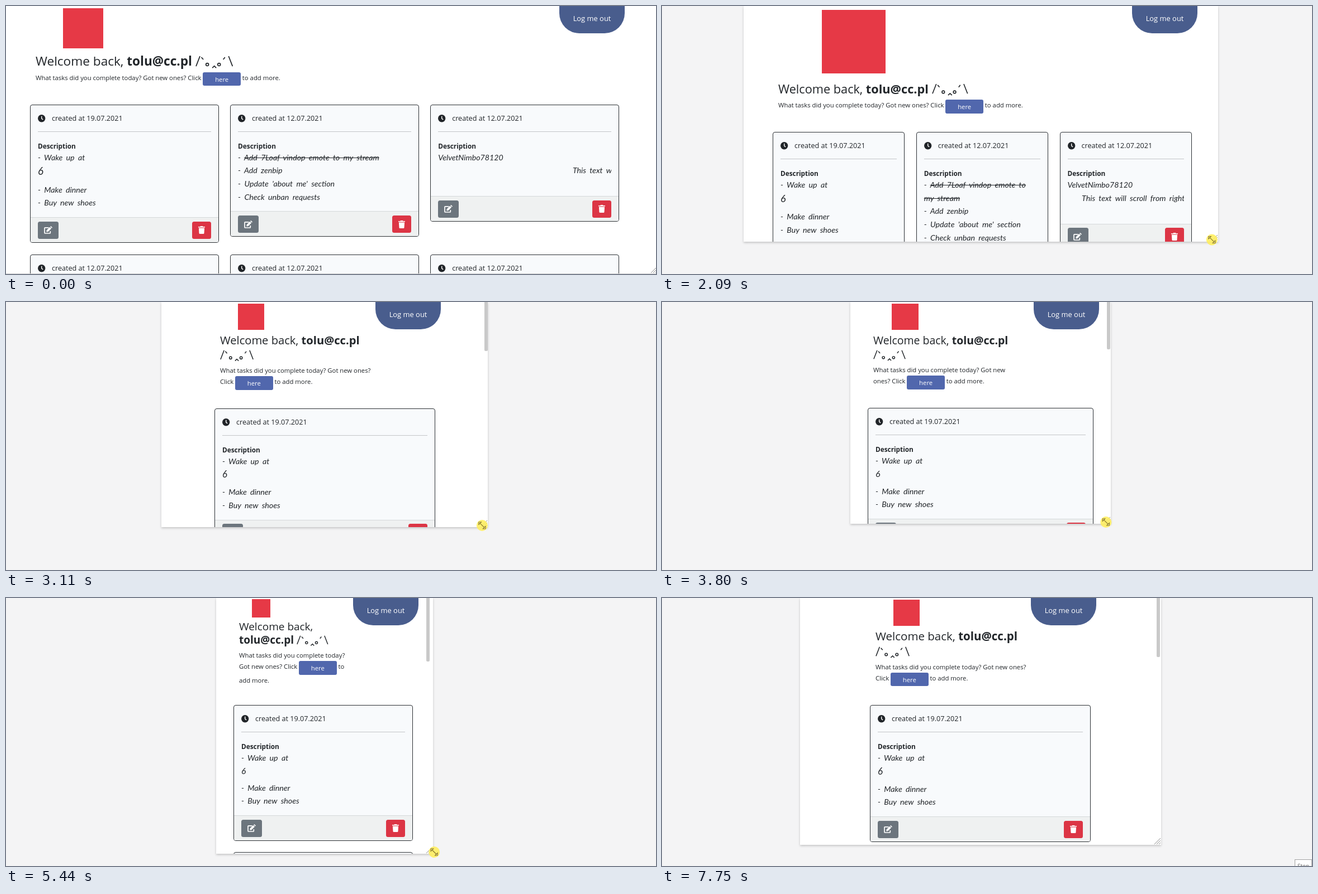
An HTML page for the animation above (7.82 s loop, 1163 px wide and 481 px high).

```html
<!DOCTYPE html>
<html lang="en">
<head>
<meta charset="utf-8">
<title>Responsive task board</title>
<style>
html, body { margin: 0; width: 100%; height: 100%; overflow: hidden; background: #f4f4f5; }
body { position: relative; color: #212529; font-family: "Open Sans", "Noto Sans", sans-serif; }
svg { display: block; overflow: visible; }
#page { position: absolute; top: 0; background: #fff; overflow: hidden; }
#shade { position: absolute; top: 0; box-shadow: 0 2px 4px rgba(0,0,0,.2); }
#main { position: absolute; top: 0; }
#logout { position: absolute; top: 0; right: -10px; width: 117px; height: 48.5px; border-radius: 0 0 36px 36px;
  background: #495d8d; color: #fff; font-size: 12.9px; line-height: 45px; text-align: center; }
#top { margin-left: 10px; }
#logo { position: relative; }
#logo i { position: absolute; left: 28.5%; top: 5%; height: 85%; aspect-ratio: 1; background: #e63946; }
#top h3 { margin: 0; font-weight: 400; font-size: calc(22.6px * var(--k)); line-height: calc(29.5px * var(--k)); }
#face { display: inline-block; width: 2.98em; height: 1.067em; vertical-align: -.22em; }
#top p { margin: 4.8px 0 33.6px; font-size: 11.3px; line-height: 20.4px; }
#here { display: inline-block; vertical-align: top; width: 67.5px; height: 24.5px; line-height: 25px;
  border-radius: 3px; background: #5167ad; color: #fff; text-align: center; }
#cards { display: grid; gap: 20.3px; align-items: start; }
.card { box-sizing: border-box; min-width: 0; border: 1px solid #2c3034; border-radius: 4px; background: #f8fafc; overflow: hidden; }
.head { position: relative; box-sizing: border-box; height: 48px; margin: 0 13px; padding-left: 25px;
  border-bottom: 1px solid #c3c5c8; font-size: 12.62px; line-height: 48px; white-space: nowrap; }
.head svg { position: absolute; left: 0; top: 17.3px; width: 13.4px; height: 13.4px; }
.text { padding: 13px 13px 14.2px; }
.text b { display: block; margin-bottom: -2.8px; font-size: 11.8px; line-height: 24px; }
.note { font: italic 400 14.2px/23.6px Lato, "Open Sans", sans-serif; word-spacing: 3px; white-space: pre; }
.big { font-size: calc(18.5px * var(--k)); line-height: calc(26.5px * var(--k)); height: calc(6.4px + 28px * var(--k)); }
.roll { overflow: hidden; margin-bottom: 20px; height: 23.6px; }
.roll span { margin-left: calc(100% - var(--roll)); }
.foot { display: flex; justify-content: space-between; box-sizing: border-box; height: 45px; padding: 6.5px 13px 0;
  border-top: 1px solid #d5d8da; background: #eff1f1; }
.btn { display: flex; align-items: center; justify-content: center; height: 31.5px; border-radius: 3.5px; }
.edit { width: 37px; background: #6c757d; }
.bin { width: 33.6px; background: #dc3545; }
#bar { position: absolute; top: 0; width: 6px; background: #c9c9c9; border-radius: 0 0 2px 2px; }
#grip { position: absolute; right: 1px; bottom: 1px; }
#mouse { position: absolute; left: 0; top: 0; }
#tip { position: absolute; left: 1132px; top: 469px; width: 29px; height: 20px; border: 1px solid #a2a2a2; background: #fff;
  color: #666; font-size: 10px; line-height: 22px; text-align: center; }
</style>
</head>
<body>
<div id="shade"></div>
<div id="page">
  <div id="main">
    <div id="top">
      <div id="logo"><i></i></div>
      <h3>Welcome back, <strong>tolu@cc.pl</strong> <svg id="face" viewBox="0 0 67 24" role="img" aria-label="cat face" fill="none" stroke="#212529" stroke-width="1.7"><path d="M1 20L8 2M10.500 4L14 8M30 23L33.500 19.500L37 23M52.500 4L49.500 8M59 2L66 20"/><circle cx="21" cy="17" r="2.400"/><circle cx="42" cy="17" r="2.400"/></svg></h3>
      <p>What tasks did you complete today? Got new ones? Click <span id="here">here</span> to add more.</p>
    </div>
    <div id="cards"></div>
    <div id="logout">Log me out</div>
  </div>
  <div id="bar"></div>
  <svg id="grip" width="11" height="11" stroke="#8c8c8c"><path d="M0 11L11 0M4 11L11 4M8 11L11 8"/></svg>
</div>
<svg id="mouse" width="1" height="1">
  <circle r="10" fill="#ffee5c" fill-opacity=".88"/>
  <path id="resize" d="M-6 -1.500V-6H-1.500ZM-3.500 -3.500L3.500 3.500M6 1.500V6H1.500Z" fill="#fff3a0" stroke="#84742a" stroke-width="1.100"/>
  <path id="arrow" d="M0 0V13L3 10.200L5 14.800L7 14L5 9.400H9Z" fill="#fff" stroke="#222" stroke-width=".9"/>
</svg>
<div id="tip">Stop</div>
<script>
const LOOP = 7820, MID = 570;
const $ = id => document.getElementById(id);

// time, half width, bottom, layout lag, pointer x, pointer y
const TRACK = [
  [0, 596, 480, 0, 1152, 497],
  [70, 596, 480, 0, 1150, 492],
  [400, 596, 480, 0, 979, 300],
  [790, 596, 480, 0, 1150, 472],
  [860, 596, 480, 0, 1150, 472],
  [1480, 585, 476, -5, 1127.5, 469.5],
  [1620, 534, 468, -3, 1092, 460],
  [2090, 424.5, 423, 3.5, 984, 419.5],
  [2420, 376, 416, 2, 938, 408],
  [3110, 292, 404, 0.5, 852, 401],
  [3250, 278, 405, 0, 838, 397],
  [4070, 211, 394, 0, 773, 394],
  [4480, 185.5, 368, 0, 748, 368],
  [4890, 186, 418, 0, 752, 411],
  [5440, 194, 459, -2.5, 766, 456],
  [5710, 249, 466, -1.5, 812, 457],
  [6200, 306, 452, -1, 872, 449],
  [6500, 323, 443, -0.5, 888, 446],
  [6610, 323, 443, -0.5, 890, 446],
  [6960, 323, 443, -0.5, 998, 493],
  [LOOP, 323, 443, -0.5, 1010, 500]
];

// smallest viewport, content width, logo width, header width, columns, word that wraps
const TIERS = [
  { min: 1178, width: 1054, logo: 172, head: 600, cols: 3, cut: '' },
  { min: 1010, width: 902, logo: 141, head: 600, cols: 3, cut: 'stream' },
  { min: 835, width: 750, logo: 273, head: 500, cols: 3, cut: 'my' },
  { min: 640, width: 568, logo: 190, head: 372, cols: 2, cut: 'stream' },
  { min: 485, width: 395, logo: 114, head: 280, cols: 1, cut: '' }
];
TIERS[3].min = 650;

function tierFor(view) {
  const tier = TIERS.find(t => view >= t.min);
  if (tier) return tier;
  const width = view - 62;
  return { width, logo: width * 0.42 - 54, head: (width + 20) * 2 / 3 - 20, cols: 1, cut: '' };
}

const CLOCK = '<svg viewBox="0 0 14 14"><circle cx="7" cy="7" r="7" fill="#212529"/><path d="M7 2.800V7.300L9.500 9.300" fill="none" stroke="#fff" stroke-width="1.500"/></svg>';
const EDIT = '<svg width="16" height="14" viewBox="0 0 16 14"><path d="M8.500 2.800H2Q1 2.800 1 3.800V12Q1 13 2 13H10.300Q11.300 13 11.300 12V9" fill="none" stroke="#fff" stroke-width="1.700"/><path d="M4.600 7.600L10.400 1.800L13 4.400L7.200 10.200L4.300 10.500ZM11.100 1.100L12.300 0L15 2.600L13.800 3.700Z" fill="#fff"/></svg>';
const BIN = '<svg width="12" height="14" viewBox="0 0 12 14"><path d="M0 1H3.400L4 0H8L8.600 1H12V2.600H0ZM.9 3.500H11.100L10.500 12.700Q10.400 14 9.200 14H2.800Q1.600 14 1.500 12.700Z" fill="#fff"/></svg>';

const note = (text, cls = '') => `<div class="note ${cls}">${text}</div>`;
const card = (date, body) => `<div class="card"><div class="head">${CLOCK}created at ${date}</div>
  <div class="text"><b>Description</b>${body}</div>
  <div class="foot"><span class="btn edit">${EDIT}</span><span class="btn bin">${BIN}</span></div></div>`;

const OLD = '12.07.2021', DONE = 'Add 7Loaf vindop emote to my stream';
const plain = note('- Water plants') + note('- Call the bank') + note('- Read a book');
$('cards').innerHTML =
  card('19.07.2021', note('- Wake up at') + note('6', 'big') + note('- Make dinner') + note('- Buy new shoes')) +
  card(OLD, note('- <s id="done"></s>') + note('- Add zenbip') + note("- Update 'about me' section") + note('- Check unban requests')) +
  card(OLD, note('VelvetNimbo78120') + note('<span>This text will scroll from right to left</span>', 'roll')) +
  card(OLD, plain).repeat(3);

function sample(t) {
  const i = Math.max(1, TRACK.findIndex(row => row[0] >= t));
  const a = TRACK[i - 1], b = TRACK[i], p = (t - a[0]) / (b[0] - a[0]);
  return a.map((v, n) => v + (b[n] - v) * p);
}

const place = (el, box) => { for (const key in box) el.style[key] = box[key] + 'px'; };

function draw(t) {
  const [, half, bottom, lag, x, y] = sample(t);
  const left = Math.round(MID - half);
  const frame = { left, width: Math.round(half * 2), height: Math.round(bottom) };
  place($('page'), frame);
  place($('shade'), frame);

  // the layout trails the frame, so its viewport differs a little
  const view = half * 2 + lag * 2, tier = tierFor(view);
  // fluid heading size relative to its largest value
  const k = Math.min(1, (20.8 + 0.006 * view / 0.8415) / 28);
  const main = $('main'), width = Math.round(tier.width);
  main.style.setProperty('--k', k);
  main.style.setProperty('--roll', (69 + t * 0.0545) % 520 + 'px');
  place(main, { left: Math.round(MID + lag - width / 2) - left, width });
  place($('top'), { width: tier.head });
  place($('logo'), { width: tier.logo, height: tier.logo * 0.501 - 1.9 });
  $('cards').style.gridTemplateColumns = `repeat(${tier.cols}, minmax(0, 1fr))`;
  const text = tier.cut ? DONE.replace(' ' + tier.cut, '\n' + tier.cut) : DONE;
  if ($('done').textContent !== text) $('done').textContent = text;

  place($('bar'), { height: bottom * bottom / (tier.cols === 3 ? 756 : 1850), right: 1 - lag * 2 });
  $('bar').style.display = tier.cut === 'my' || t < 860 ? 'none' : '';

  const dragging = t > 790 && t < 6610;
  $('mouse').style.transform = `translate(${x}px, ${y}px)`;
  $('resize').style.display = dragging ? '' : 'none';
  $('arrow').style.display = dragging ? 'none' : '';
  $('tip').style.display = t >= 7750 ? '' : 'none';
}

const start = performance.now();
function tick() {
  draw((performance.now() - start) % LOOP);
  requestAnimationFrame(tick);
}
tick();
</script>
</body>
</html>
```
